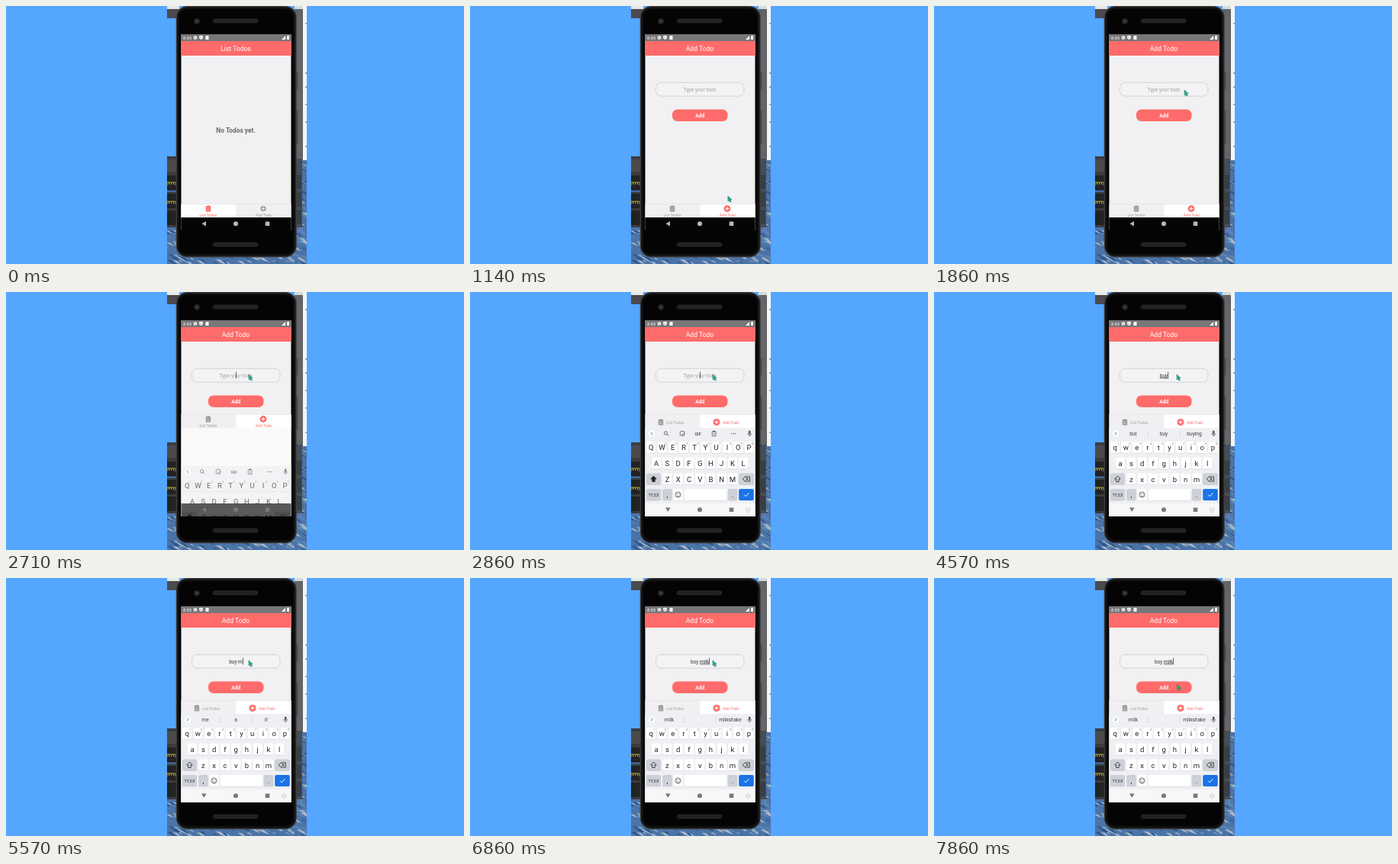
Write an HTML page with a canvas that moves like this. It is 600x338 px and loops after 8 s.

```html
<!DOCTYPE html>
<html>
<head>
<meta charset="utf-8">
<style>
html, body { margin: 0; width: 600px; height: 338px; overflow: hidden; background: #54a6ff; }
canvas { display: block; }
</style>
</head>
<body>
<canvas id="stage" width="600" height="338"></canvas>
<script>
const c = document.getElementById('stage').getContext('2d');
const STEP = 1000 / 7, LOOP = 8000;
const RED = '#ff6b6b', INK = '#222428', GREY = '#9c9c9e', SKY = '#54a6ff';

function box(x, y, w, h, fill, r = 0, stroke, lw = 1) {
  c.beginPath();
  c.roundRect(x, y, w, h, r);
  if (fill) { c.fillStyle = fill; c.fill(); }
  if (stroke) { c.strokeStyle = stroke; c.lineWidth = lw; c.stroke(); }
}
function dot(x, y, r, fill, stroke, lw = 1) {
  box(x - r, y - r, 2 * r, 2 * r, fill, r, stroke, lw);
}
function path(points, fill, stroke, lw = 1) {
  c.beginPath();
  for (let i = 0; i < points.length; i += 2) c.lineTo(points[i], points[i + 1]);
  if (fill) { c.fillStyle = fill; c.fill(); }
  if (stroke) { c.strokeStyle = stroke; c.lineWidth = lw; c.stroke(); }
}
function text(s, x, y, size, color, weight = 400, align = 'center') {
  c.font = `${weight} ${size}px Roboto, sans-serif`;
  c.textAlign = align;
  c.fillStyle = color;
  c.fillText(s, x, y);
}
function seeded(seed) {
  return () => (seed = seed * 16807 % 2147483647) / 2147483647;
}

// Slanted streaks of foam and shade
function water(x, y, w, h, foam) {
  const rnd = seeded(41 + x);
  c.save();
  c.beginPath();
  c.rect(x, y, w, h);
  c.clip();
  box(x, y, w, h, '#4a74a8');
  for (let i = 0; i < w * h / 45; i++) {
    const px = x + rnd() * w, py = y + rnd() * h, s = 3 + rnd() * 5;
    const color = rnd() < foam ? '#a9b8c8' : rnd() < .5 ? '#2f5589' : '#5a84b6';
    path([px - s, py - s * .4, px, py - s * .3, px + s, py + s * .6, px, py + s * .2], color);
  }
  c.restore();
}

function desktop() {
  box(0, 0, 600, 338, SKY);
  box(211, 0, 16, 4, '#e6e7e9');
  box(211, 4, 16, 12, '#4a4b4e');
  box(211, 197, 16, 93, '#3c3c3e');
  box(211, 201, 16, 16, '#4b4b4d');
  for (const y of [222, 246, 268]) box(211, y, 14, 19, '#222325');
  box(211, 242, 14, 1.5, '#3d7cc4');
  for (const y of [232, 257]) {
    path([211, y + 3, 211, y - 1, 222, y - 1, 222, y + 3], null, '#b5a62c', 1);
    for (let x = 213; x < 222; x += 3) box(x, y - 1, 1, 3, '#b5a62c');
  }
  water(211, 290, 183, 48, .5);
  box(378, 0, 11, 202, '#646568');
  box(378, 0, 11, 4, '#d9dadc');
  box(389, 0, 5, 204, '#f5f5f6');
  for (const y of [22, 87, 105, 128, 151, 183]) box(392, y, 2, 2, '#a2a4a7');
  water(378, 202, 16, 136, .16);
  box(378, 200, 10, 90, '#484d54');
  for (let y = 221; y < 290; y += 23) box(380, y, 7, 19, '#3a3d43');
}

function phone() {
  box(380, 87, 2.5, 22, '#4a4b4d', 1);
  box(380, 137, 2.5, 44, '#4a4b4d', 1);
  box(223.5, .8, 156.5, 327.7, '#090909', 14, '#3c3d3f', 1.6);
  box(226, 3, 151.5, 323, '#040404', 12, '#1b1c1d');
  box(271, 17, 59, 5, '#202123', 2.5, '#343537', .6);
  box(271, 310, 59, 5, '#202123', 2.5, '#343537', .6);
  dot(250, 20, 3.4, '#1b1d21', '#2d2f33');
  dot(250, 20, 1.4, '#4c5260');
}

function header(title) {
  box(229, 37, 145, 257, '#f1f0f2');
  box(229, 37, 145, 9, '#77777a');
  text('8:45', 232, 44, 5.6, '#fff', 400, 'left');
  dot(248, 41.5, 2.2, '#fff');
  dot(248, 41.5, .8, '#77777a');
  path([253, 39.5, 255.5, 38.8, 258, 39.5, 257.6, 42.5, 255.5, 44, 253.4, 42.5], '#fff');
  dot(255.5, 41.3, .7, '#77777a');
  path([261.5, 40, 262.5, 39, 265.5, 39, 265.5, 44, 261.5, 44], '#fff');
  path([361, 44, 366, 39, 366, 44], '#fff');
  box(368, 39.3, 3, 4.7, '#fff', .4);
  box(368.9, 38.6, 1.2, 1, '#fff');
  box(229, 46, 145, 19, RED);
  text(title, 301, 58.7, 8.5, '#fff');
}

function clipboard(x, y, color) {
  box(x - 3.2, y - 3.4, 6.4, 7.4, color, .7);
  box(x - 1.3, y - 4.3, 2.6, 2, color, .8);
  for (const d of [-1, .5, 2]) box(x - 1.8, y + d, 3, .6, '#fff9');
}
function plus(x, y, color, r) {
  dot(x, y, r, color);
  path([x - r * .55, y, x + r * .55, y], null, '#fff', 1.1);
  path([x, y - r * .55, x, y + r * .55], null, '#fff', 1.1);
}
function tabs(y, adding, inline) {
  const left = adding ? GREY : RED, right = adding ? RED : GREY;
  box(229, y, 145, 18, '#f0eff1');
  box(adding ? 301.5 : 229, y, 72.5, 18, '#fff');
  box(229, y - .5, 145, .6, '#dddce0');
  if (inline) {
    clipboard(250, y + 10, left);
    plus(323, y + 10, right, 4.5);
    text('List Todos', 257, y + 12, 5, left, 400, 'left');
    text('Add Todo', 331, y + 12, 5, right, 400, 'left');
  } else {
    clipboard(265, y + 6, left);
    plus(337, y + 6, right, adding ? 4.4 : 3.6);
    text('List Todos', 265, y + 16.2, 5, left);
    text('Add Todo', 337.5, y + 16.2, 5, right);
  }
}

function navBar(color, keyboardOpen) {
  if (keyboardOpen) path([256, 282.5, 262.5, 282.5, 259.3, 288], color);
  else path([262, 282, 262, 288.5, 256.5, 285.2], color);
  dot(301, 285.2, 3, color);
  box(339.7, 282.5, 5.6, 5.6, color);
}

function key(x, y, w, label, fill = '#fff') {
  box(x - w / 2, y + .6, w, 15, '#cfd1d5', 2);
  box(x - w / 2, y, w, 15, fill, 2);
  if (label) text(label, x, y + 11.3, 9.6, INK);
}
function toolbar(words) {
  const ink = '#55585d';
  dot(238, 185.5, 4.8, '#fff', '#dfe0e3', .5);
  const d = words ? 1 : -1;
  path([238 - d, 183.5, 238 + d, 185.5, 238 - d, 187.5], null, ink, .9);
  box(364.9, 181.5, 2.6, 4.8, ink, 1.3);
  path([363.8, 185, 364.5, 187.3, 368, 187.3, 368.7, 185], null, ink, .7);
  box(365.9, 187, .8, 2.2, ink);
  if (words) {
    words.forEach((w, i) => text(w, 261 + i * 40, 187.7, 6.6, '#3d4045'));
    if (!words[1]) path([298.6, 182.5, 302.4, 182.5, 301.8, 188.5, 299.2, 188.5], '#fafafa', '#dde2e8', .5);
    for (const x of [280, 322]) box(x, 181, .6, 9, '#cfd1d5');
    return;
  }
  dot(256.5, 184.8, 2.1, null, ink, .9);
  path([258, 186.3, 260.2, 188.5], null, ink, 1);
  box(275.3, 182.6, 5.6, 5.6, null, .8, ink, .8);
  path([278.4, 188, 278.4, 185.8, 280.9, 185.8], null, ink, .7);
  text('GIF', 298.5, 187.5, 5.4, ink, 700);
  box(317.2, 182.7, 5, 6, null, .6, ink, .8);
  box(318.3, 181.8, 2.8, 1.7, ink);
  for (const y of [185.2, 186.8]) box(318.4, y, 2.6, .5, ink);
  for (const x of [342.8, 345.3, 347.8]) dot(x, 185.5, .7, ink);
}
function keyboard(offset, alpha, upper, words) {
  const label = s => upper ? s.toUpperCase() : s;
  c.save();
  c.translate(0, offset);
  c.globalAlpha = alpha;
  box(229, 178, 145, 118, '#eff0f3');
  toolbar(words);
  [...'qwertyuiop'].forEach((s, i) => {
    const x = 237.2 + i * 14.25;
    key(x, 196, 12.3, label(s));
    text((i + 1) % 10, x + 4.3, 199.7, 3.6, '#777');
  });
  [...'asdfghjkl'].forEach((s, i) => key(244.2 + i * 14.25, 216.8, 12.3, label(s)));
  [...'zxcvbnm'].forEach((s, i) => key(258.5 + i * 14.25, 237.4, 12.3, label(s)));
  const side = '#cdd0d6';
  key(240.5, 237.4, 19, '', side);
  path([240.5, 241, 244.2, 245, 242.2, 245, 242.2, 248.5, 238.8, 248.5, 238.8, 245, 236.8, 245, 240.5, 241],
    upper ? INK : null, INK, .8);
  key(362, 237.4, 19.5, '', side);
  path([357.3, 245, 360, 242, 366.4, 242, 366.4, 248, 360, 248, 357.3, 245], null, INK, .8);
  path([361.3, 243.3, 364.5, 246.7], null, INK, .8);
  path([364.5, 243.3, 361.3, 246.7], null, INK, .8);
  key(240.5, 258, 19, '', side);
  text('?123', 240.5, 267.8, 6.2, INK);
  key(258.5, 258, 12.3, ',', side);
  key(272.5, 258, 12.3, '');
  dot(272.5, 265.5, 3.5, null, INK, .7);
  for (const x of [271.2, 273.8]) dot(x, 264.5, .5, INK);
  path([270.8, 266.5, 272.5, 267.8, 274.2, 266.5], null, INK, .6);
  key(308.3, 258, 55.5, '');
  key(344, 258, 12.3, '.', side);
  key(362, 258, 19.5, '', '#1b73e8');
  path([359, 265.6, 361.2, 267.8, 365.4, 263.4], null, '#fff', 1);
  c.restore();
}

function field(typed, caret, underlined) {
  box(243.5, 100.3, 115.5, 17.8, '#f3f2f4', 7, '#d0cfd2', .9);
  text(typed || 'Type your todo', 301, 111.5, 6.5, typed ? '#333' : '#a3a3a6');
  const w = typed ? c.measureText(typed).width : 0;
  if (underlined) {
    const part = c.measureText(typed.split(' ').pop()).width;
    box(301 + w / 2 - part, 112.6, part, .6, '#444');
  }
  if (caret) box(301 + w / 2 + (typed ? .2 : 0), 104.5, .8, 9, '#444');
}
function pointer(x, y) {
  path([x, y, x + 5.2, y + 4.8, x + 3.1, y + 5.2, x + 4.3, y + 7.5, x + 2.8, y + 8, x + 1.8, y + 5.8, x + .2, y + 7, x, y],
    '#13b58d', '#3d6f66', .6);
}

// Pointer stops: step, x, y
const stops = [[1, 366, 236], [3, 339, 265], [7, 339, 265], [12, 328, 110], [14, 328, 110],
  [16, 318, 108], [52, 318, 108], [55, 318.5, 139.5]];
function pointerAt(f) {
  const i = stops.findIndex(s => s[0] >= f);
  if (i < 1) return stops[0].slice(1);
  const a = stops[i - 1], b = stops[i];
  const k = (f - a[0]) / (b[0] - a[0]), e = k * k * (3 - 2 * k);
  return [a[1] + (b[1] - a[1]) * e, a[2] + (b[2] - a[2]) * e];
}

const PHRASE = 'buy milk';
const strokes = [29, 30, 31, 36, 39, 41, 43, 46];
const hints = [[46, ['milk', '', 'milkshake']], [44, ['mil', 'milk', 'mile']], [42, ['mi', 'milk', 'mine']],
  [40, ['m', 'milk', 'my']], [37, ['me', 'a', 'it']], [32, ['but', 'buy', 'buying']], [30, ['b', 'be', 'by']]];

function draw(f) {
  const adding = f >= 8, open = f >= 18;
  const slide = Math.min(1, Math.max(0, (f - 17) / 3)), settled = slide === 1;
  const count = strokes.filter(s => s <= f).length;
  const typed = PHRASE.slice(0, count);
  const lastEvent = count ? strokes[count - 1] : 17;
  const caret = f >= 17 && (f - lastEvent) % 7 < 3.5;

  desktop();
  phone();
  c.save();
  c.beginPath();
  c.rect(229.5, 37, 144, 257);
  c.clip();
  header(adding ? 'Add Todo' : 'List Todos');
  if (adding) {
    field(typed, caret, count > 4 && f > 39 || count === 3 && f > 31);
    box(265, 135.5, 72.5, 15.5, RED, 6.5);
    text('Add', 301.2, 145.6, 6.5, '#fff', 700);
  } else {
    text('No Todos yet.', 301, 165.5, 8.35, '#6a6a6a', 700);
  }
  if (open) {
    box(229, 178, 145, 116, '#fafafa');
    tabs(160.5, true, settled);
    const hint = hints.find(h => f >= h[0]);
    keyboard(150 * (1 - slide), settled ? 1 : slide, count === 0, hint && hint[1]);
    box(229, 277, 145, 17, settled ? '#f7f7f8' : `rgba(0, 0, 0, ${1.3 - slide})`);
    navBar(settled ? '#77787b' : '#77787a', settled);
    if (settled) {
      box(361.5, 283.5, 5, 3, null, .5, '#b6b8bb', .6);
      path([362.5, 288, 364, 289, 365.5, 288], null, '#b6b8bb', .6);
    }
  } else {
    tabs(259.5, adding, false);
    box(229, 277, 145, 17, '#050505');
    navBar('#b9babb', false);
  }
  c.restore();
  if (f >= 1) pointer(...pointerAt(f));
}

let shown = -1;
function tick() {
  const f = Math.floor((performance.now() % LOOP + 4) / STEP) % 56;
  if (f !== shown) draw(shown = f);
  requestAnimationFrame(tick);
}
tick();
</script>
</body>
</html>
```
